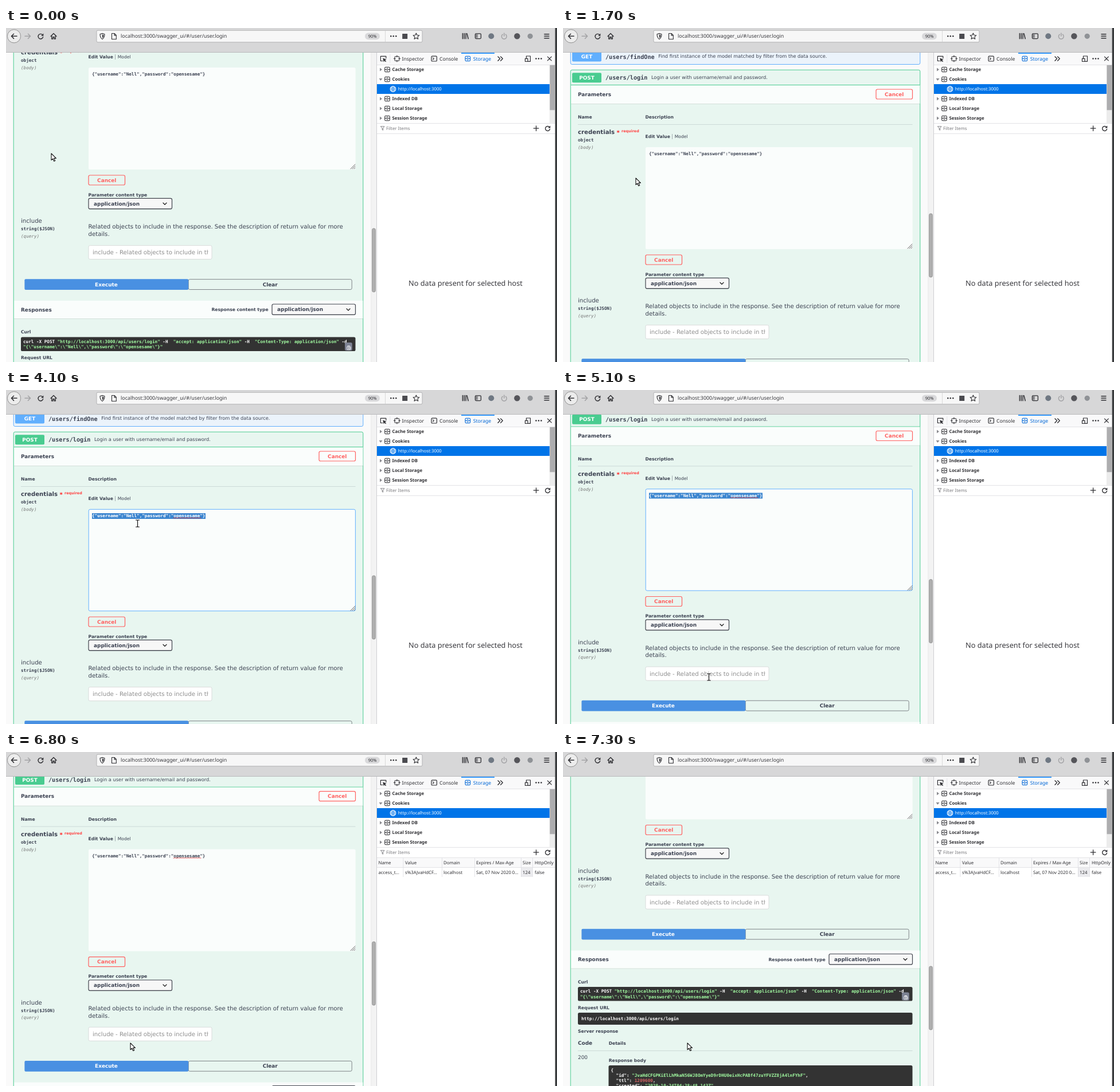
These frames come from a looping animation (961x583 px, 8000 ms). An HTML page:

```html
<!DOCTYPE html>
<html lang="en">
<head>
<meta charset="utf-8">
<title>API explorer login</title>
<style>
html, body { margin: 0; width: 100%; height: 100%; overflow: hidden; background: #fff; }
svg { display: block; width: 961px; height: 583px; }
text { font-family: "DejaVu Sans", sans-serif; white-space: pre; text-rendering: geometricPrecision; cursor: default; }
.b { font-weight: 700; }
.m { font-family: "DejaVu Sans Mono", monospace; }
.i { font-style: italic; }
.u { font-family: "Noto Sans", sans-serif; }
.mid { text-anchor: middle; }
.str { fill: #a2fca2; }
.num { fill: #d36363; }
</style>
</head>
<body>
<svg id="stage" viewBox="0 0 961 583"></svg>
<script>
const INK = '#3b4151', UI = '#2f2f33', RED = '#ff6060', GREEN = '#49cc90', BLUE = '#61affe';
// page font sizes after browser zoom
const S10 = 6.37, S12 = 7.64, S13 = 8.28, S14 = 8.92, S16 = 10.19, TAB = 8.6, SMALL = 7.8;

// y is the middle of the capitals
const text = (x, y, s, size, cls = '', fill = INK, extra = '') =>
  `<text x="${x}" y="${(y + size * .36).toFixed(2)}" font-size="${size}" class="${cls}" fill="${fill}" ${extra}>${s}</text>`;
const rect = (x, y, w, h, fill, extra = '') =>
  `<rect x="${x}" y="${y}" width="${w}" height="${h}" fill="${fill}" ${extra}/>`;
const box = (x, y, w, h, fill, stroke, r = 2.5, sw = 1.2, extra = '') =>
  rect(x, y, w, h, fill, `rx="${r}" stroke="${stroke}" stroke-width="${sw}" ${extra}`);
const line = (d, color = UI, w = 1.1, extra = '') =>
  `<path d="${d}" fill="none" stroke="${color}" stroke-width="${w}" stroke-linecap="round" stroke-linejoin="round" ${extra}/>`;
const fillPath = (d, color) => `<path d="${d}" fill="${color}"/>`;
const dot = (x, y, r, color) => `<circle cx="${x}" cy="${y}" r="${r}" fill="${color}"/>`;
const ring = (x, y, r, color, w = 1.1) => `<circle cx="${x}" cy="${y}" r="${r}" fill="none" stroke="${color}" stroke-width="${w}"/>`;
const group = (id, body, extra = '') => `<g id="${id}" ${extra}>${body}</g>`;
const dots = (x, y) => [-4.5, 0, 4.5].map(d => dot(x + d, y, 1.3, UI)).join('');
const reload = (x, y, r) =>
  line(`M${x + r * .8} ${y - r * .6}A${r} ${r} 0 1 0 ${x + r} ${y + r * .25}`, UI, 1.4) +
  fillPath(`M${x + r + .8} ${y - r - .8}v${r}h${-r}z`, UI);

const button = (x, y, w, label) =>
  box(x, y, w, 17, 'none', RED) + text(x + w / 2, y + 8.5, label, S14, 'b mid', RED);
const select = (x, y) =>
  rect(x, y + 1.2, 145.5, 18.4, '#000', 'rx="3" opacity=".16"') +
  box(x, y, 145.5, 18.4, '#f7f7f7', '#41444e') +
  text(x + 9, y + 9.2, 'application/json', S14, 'b') +
  line(`M${x + 130} ${y + 8}l3 3l3 -3`, '#222', 1.3);
const band = (y, h) =>
  rect(14, y, 608.5, h, '#fff', 'opacity=".8"') +
  rect(14, y + h, 608.5, 1, '#000', 'opacity=".09"');
const rule = y => rect(26, y, 583.5, .8, INK, 'opacity=".2"');
const code = (x, y, h) => rect(x, y, 609.5 - x, h, '#333', 'rx="2.6"');
const op = (y, h, method, path, about, color) =>
  box(13.2, y, 609.6, h, color, color, 2.6, 1, 'fill-opacity=".1"') +
  rect(16, y + 5, 51, 17, color, 'rx="2"') +
  text(41.5, y + 13.5, method, S14, 'b mid', '#fff') +
  text(74, y + 13.5, path, S16, 'm b') +
  text(path.length * 6.135 + 80.3, y + 13, about, S13);

const credentials = '{"username":"Nell","password":"opensesame"}';
const curl1 = 'curl -X POST <tspan class="str">"http://localhost:3000/api/users/login"</tspan> -H  ' +
  '<tspan class="str">"accept: application/json"</tspan> -H  <tspan class="str">"Content-Type: application/json"</tspan> -d';
const curl2 = '"{\\"username\\":\\"Nell\\",\\"password\\":\\"opensesame\\"}"';
const token = 'JvaHdCFGPKiElLhMkaN56WJ8OmYyeD9rDHU0eixHcPABf47zuYFVZZ8jA4lnFYhF';
const mono = (x, y, s, fill = '#fff') => text(x, y, s, S12, 'm b', fill);
const str = s => `<tspan class="str">"${s}"</tspan>`;

function squiggle() {
  let d = 'M292 224';
  for (let x = 292; x < 339; x += 2.4) d += 'l1.2 -1.3l1.2 1.3';
  return line(d, '#e02a2a', .8);
}

function params() {
  return op(36.5, 27, 'GET', '/users/findOne', 'Find first instance of the model matched by filter from the data source.', BLUE) +
    op(73.2, 1300, 'POST', '/users/login', 'Login a user with username/email and password.', GREEN) +
    rect(14, 99, 608.5, 1, GREEN) +
    band(100, 32) + text(26, 115.5, 'Parameters', S14, 'b') + button(546, 107, 63.5, 'Cancel') +
    text(26, 155.7, 'Name', S12, 'b') + text(143.5, 155.7, 'Description', S12, 'b') + rule(168) +
    text(26, 181.8, 'credentials', S16, 'b') + text(93.4, 182.5, '*', S16, 'b', '#f22') +
    text(102, 180, 'required', S10, 'b', '#f44') +
    text(26, 195.6, 'object', S12, 'm b') + text(26, 208.6, '(body)', S12, 'm i', '#777') +
    text(143.5, 189.7, 'Edit Value', S12, 'b') + rect(190.2, 185, .8, 9, INK, 'opacity=".5"') +
    text(194.7, 189.7, 'Model', S12) +
    rect(144, 208, 465.6, 178, '#fff', 'rx="2.6" opacity=".8"') +
    group('focus', box(144.2, 208.3, 465.2, 177.4, 'none', BLUE, 2.6, 1)) +
    group('marked', rect(150, 215, 198, 10, '#3b85cf')) +
    text(150, 219.4, credentials, S12, 'm b', INK, 'id="creds"') +
    group('spell', squiggle()) +
    line('M601 385l8 -8M604 385l5 -5M607 385l2 -2', '#555', .9) +
    button(144, 396, 63.5, 'Cancel') +
    text(143.5, 430, 'Parameter content type', S12, 'b') + select(144, 436.3) +
    text(26, 475.4, 'include', S16) + text(26, 489.3, 'string($JSON)', S12, 'm b') +
    text(26, 502, '(query)', S12, 'm i', '#777') +
    text(143.5, 485.6, 'Related objects to include in the response. See the description of return value for more', S16) +
    text(143.5, 498.3, 'details.', S16) +
    box(144, 518.6, 215, 24, '#fff', '#d6d9d8', 2.5, .9) +
    text(151, 530.6, 'include - Related objects to include in the response', S16, '', '#8d8d8d', 'clip-path="url(#field)"') +
    group('hover', box(32, 576.9, 286.5, 19, 'none', '#000', 3, 1.6, 'opacity=".25"')) +
    box(318.2, 577.7, 285, 17.8, 'none', '#7d8387', 2.4, 1) +
    rect(32.4, 577.2, 285.8, 18.8, '#4990e2', 'rx="2"') +
    text(175, 586.5, 'Execute', S14, 'b mid', '#fff') + text(460.7, 586.5, 'Clear', S14, 'b mid');
}

function responses() {
  return band(615, 31) + text(26, 630.3, 'Responses', S14, 'b') +
    text(358.5, 630.3, 'Response content type', S12, 'b') + select(464, 621) +
    text(26, 669.7, 'Curl', S12, 'b') + code(26, 678.5, 24.6) +
    mono(30, 686.2, curl1) + mono(30, 695.3, curl2, '#a2fca2') +
    rect(591, 688, 12.8, 14, '#7d8293', 'rx="2.5"') +
    box(594.8, 695, 6, 5.5, 'none', '#fff', .6, .9) + line('M596 694h3.4M601 697.8h-4m1.3 -1.3l-1.3 1.3l1.3 1.3', '#fff', .9) +
    text(26, 714.3, 'Request URL', S12, 'b') + code(26, 723.4, 21) +
    mono(32, 733.7, 'http://localhost:3000/api/users/login') +
    text(26, 755.6, 'Server response', S12, 'b') +
    text(26, 776.5, 'Code', S14, 'b') + text(79.7, 776.5, 'Details', S12, 'b') + rule(789.6) +
    text(26, 801.5, '200', S14) + text(79.7, 806.7, 'Response body', S12, 'b') + code(79.5, 815.4, 60) +
    mono(83.4, 823.5, '{') +
    mono(83.4, 832.6, `  "id": ${str(token)},`) +
    mono(83.4, 841.8, '  "ttl": <tspan class="num">1209600</tspan>,') +
    mono(83.4, 851, `  "created": ${str('2020-10-24T04:28:48.143Z')},`);
}

function toolbar() {
  return rect(0, 0, 961, 43, '#d7d7d8') + rect(0, 42, 958, 1, '#b9b9bb') +
    `<circle cx="14" cy="14.3" r="11.6" fill="#ececec" stroke="#8f8f8f"/>` +
    line('M19 14.3H9.5M13.5 10.2l-4.1 4.1l4.1 4.1', UI, 1.5) +
    line('M33 14.3h9.5M38.5 10.2l4.1 4.1l-4.1 4.1', '#a3a3a5', 1.5) +
    reload(60.3, 14.5, 4.3) +
    line('M78 14.6l5 -5l5 5M79.7 14v5h2.2v-3.2h2.2v3.2h2.2v-5', UI, 1.4) +
    box(158, 4.2, 568, 20.6, '#f7f7f7', '#b2b2b4', 2, 1) +
    line('M168 9.6l4 1.2c0 4.5 -1.2 7 -4 8.8c-2.8 -1.8 -4 -4.3 -4 -8.8z') + fillPath('M168 11.5l2.4 .7c0 2.8 -.8 4.3 -2.4 5.6z', UI) +
    line('M184.5 9.5h4.6l3.2 3.2v6.8h-7.8zM189 9.7v3.2h3') +
    text(200, 14.2, 'localhost:3000/swagger_ui/#/user/user.login', 8.9, 'u', '#38383d') +
    rect(626, 8.6, 26, 11.6, '#d9d9db', 'rx="5.8"') + text(639, 14.4, '90%', 7.4, 'u mid', UI) +
    rect(661, 5, .7, 19, '#ccc') + dots(675.8, 14.3) +
    rect(691.2, 10, 9, 9, '#4a4a4f', 'rx=".5"') +
    line('M715.4 9l1.6 3.5l3.7 .4l-2.8 2.5l.8 3.8l-3.3 -1.9l-3.3 1.9l.8 -3.8l-2.8 -2.5l3.7 -.4z') +
    line('M796.4 9.6v9.2M799.2 9.6v9.2M802 9.6v9.2M804 9.8l2.2 9', UI, 1.5) +
    box(818.4, 9.8, 10, 8.8, 'none', UI, 1.5, 1.3) + rect(819.5, 11, 3, 6.4, '#77777b') +
    dot(846.3, 14.3, 5, '#6f7883') +
    line('M866.3 11.2a4.4 4.4 0 1 0 5 0M868.8 9v5', '#a0a0a3', 1.4) +
    dot(891.4, 14.3, 5.2, '#55555a') + dot(914.2, 14.3, 4.6, '#8f9296') +
    line('M939 10.8h8M939 14.3h8M939 17.8h8', UI, 1.4);
}

const cylinder = (x, y, c) => box(x - 4.3, y - 4.3, 8.6, 8.6, 'none', c, 1.8, 1.1) +
  line(`M${x - 4} ${y}h8M${x - 1} ${y - 2.2}h2M${x - 1} ${y + 2.2}h2`, c, 1);
const treeRow = (label, i) => {
  const y = [72.5, 89.5, 123.5, 140.5, 157.5][i];
  const mark = i === 1 ? `M650.5 ${y - 1.5}h6l-3 4z` : `M652 ${y - 3}l4 3l-4 3z`;
  return fillPath(mark, '#8a8a8f') + cylinder(665, y, UI) + text(673.5, y, label, SMALL, 'u b', UI);
};

function cookieTable() {
  const x = [649.5, 696, 763, 820, 901, 922];
  const head = ['Name', 'Value', 'Domain', 'Expires / Max-Age', 'Size', 'HttpOnly'];
  const row = ['access_t...', 's%3AJvaHdCF...', 'localhost', 'Sat, 07 Nov 2020 0...', '124', 'false'];
  const cells = (list, y) => list.map((s, i) => text(x[i], y, s, SMALL, 'u', UI)).join('');
  return rect(647, 185, 310.5, 398, '#fff') + rect(647, 185, 310.5, 16, '#f9f9fa') +
    rect(647, 201, 310.5, .8, '#dcdce0') + rect(898, 202, 20, 16, '#ebebee') +
    [692.5, 760, 817, 898, 918].map(c => rect(c, 185, .8, 33, '#dddde1')).join('') +
    cells(head, 193.3) + cells(row, 209.8);
}

function devtools() {
  const blue = '#0067d6';
  return rect(646, 43, 312, 540, '#fff') + rect(646, 43, .9, 540, '#c9c9cd') +
    rect(647, 43, 311, 21, '#f9f9fa') + rect(647, 64, 311, .8, '#dcdce0') +
    line('M657 57.5h-3.6v-8.2h9.4v3.4', UI, 1.2) + fillPath('M657.2 52.4l6.5 2.6l-2.6 1.1l2 2.2l-1 1l-2.1 -2.1l-1.2 2.4z', UI) +
    rect(669.5, 46, .7, 15, '#dcdce0') +
    box(678, 49.7, 7.8, 7.6, 'none', UI, 1.4, 1.1) + line('M676.4 53.5h2.6M685 53.5h2.6M681.9 48v2.6M681.9 56.4v2.6') +
    text(690.5, 53.6, 'Inspector', TAB, 'u', UI) +
    box(742, 49.2, 9.4, 8.8, 'none', UI, 1.6, 1.2) + line('M744.4 51.8l2 1.8l-2 1.8') +
    text(756, 53.6, 'Console', TAB, 'u', UI) +
    rect(794, 43.2, 58, 1.6, '#0a84ff') + cylinder(805.3, 53.5, blue) + text(814.8, 53.6, 'Storage', TAB, 'u', blue) +
    line('M858 50l3.6 3.6l-3.6 3.6M862.7 50l3.6 3.6l-3.6 3.6', UI, 1.4) +
    line('M907.5 49h7v9.3h-4.3M907.5 49v3.5M905.5 53.3h4.5v5.2h-4.5z', UI, 1.2) + dots(929, 53.5) +
    line('M944.5 50.1l6.8 6.8M951.3 50.1l-6.8 6.8', UI, 1.3) +
    rect(647, 98, 301, 17, '#0074e8') +
    ['Cache Storage', 'Cookies', 'Indexed DB', 'Local Storage', 'Session Storage'].map(treeRow).join('') +
    ring(675, 106.5, 4.8, '#fff') + `<ellipse cx="675" cy="106.5" rx="2.1" ry="4.8" fill="none" stroke="#fff" stroke-width=".9"/>` +
    line('M670.4 105h9.2M670.4 108h9.2', '#fff', .9) +
    text(683.8, 106.5, 'http://localhost:3000', SMALL, 'u', '#fff') +
    rect(948, 64.8, 9.7, 101, '#ececec') + rect(948.5, 64.8, 8.7, 78.5, '#adadaf') +
    rect(647, 166, 311, .8, '#dcdce0') + rect(647, 184, 311, .8, '#dcdce0') +
    line('M653.6 171.8h6.4l-2.4 3v3.6l-1.6 -1v-2.6z', '#77777b', .9) +
    text(663, 175, 'Filter Items', SMALL, 'u', '#77777b') +
    line('M920.3 175.2h8.6M924.6 170.9v8.6', UI, 1.3) + reload(944.6, 175.4, 4) +
    text(801.5, 445.8, 'No data present for selected host', 12.7, 'u mid', '#38383d') +
    group('table', cookieTable());
}

const hand = 'M2 1.2c0 -1.6 2 -1.6 2 0v3.6l4.6 1c1 .3 1.3 1 1.2 2l-.6 3.6h-5.8l-3.4 -4.4c-.6 -1.2 .6 -1.8 1.4 -1l.6 .6z';
const cursors =
  group('arrow', `<path d="M0 0v11.6l2.7 -2.4l2 4.4l2 -.9l-2 -4.3h3.7z" fill="#fff" stroke="#111" stroke-width="1.1" stroke-linejoin="round"/>`) +
  group('beam', line('M-3 -6h2l1 .8l1 -.8h2M0 -5.2v10.4M-3 6h2l1 -.8l1 .8h2', '#fff', 2.6) +
    line('M-3 -6h2l1 .8l1 -.8h2M0 -5.2v10.4M-3 6h2l1 -.8l1 .8h2', '#111', 1.2)) +
  group('hand', `<path d="${hand}" fill="#fff" stroke="#111" stroke-width="1.1" stroke-linejoin="round"/>`);

document.getElementById('stage').innerHTML =
  `<defs><clipPath id="view"><rect y="43" width="637" height="540"/></clipPath>
   <clipPath id="field"><rect x="151" y="519" width="201.6" height="23"/></clipPath></defs>` +
  rect(0, 43, 637, 540, '#fafafa') +
  `<g clip-path="url(#view)">${group('page', params() + group('resp', responses()))}</g>` +
  rect(637, 43, 9, 540, '#f3f3f3') + rect(636.6, 43, .6, 540, '#dedede') +
  box(638.6, 324, 5.8, 111, '#b0b0b0', '#8c8c8c', 2.6, .8, 'id="thumb"') +
  devtools() + toolbar() + rect(957.7, 0, 3.3, 583, '#3a3c3e') +
  group('cursor', cursors);

// [time, value...]
const scrollKeys = [[0, 139], [100, 153], [600, 153], [700, 146], [900, 90], [1100, 12], [1200, 0], [4800, 0],
  [4900, 12], [5000, 28], [5100, 35.5], [5200, 38.3], [6900, 38.3], [7000, 90], [7100, 165], [7200, 228], [7300, 268.5]];
const moveKeys = [[0, 79, 219], [600, 79, 219], [1200, 93, 237], [1600, 93, 237], [1700, 127, 262], [1800, 178, 256],
  [1900, 234, 240], [2000, 222, 224], [4000, 222, 224], [4100, 229.5, 233], [4700, 240, 461], [4800, 240, 461],
  [5100, 254.5, 501], [5700, 250, 548], [6400, 250, 548], [6800, 217, 508]];
const kindKeys = [[0, 'arrow'], [1800, 'beam'], [4500, 'arrow'], [5000, 'beam'], [5300, 'arrow'], [5600, 'hand'], [6600, 'arrow']];

function at(keys, t) {
  const i = keys.findIndex(k => k[0] > t);
  if (i < 0) return keys[keys.length - 1].slice(1);
  const a = keys[i - 1], b = keys[i], p = (t - a[0]) / (b[0] - a[0]);
  return a.slice(1).map((v, n) => v + (b[n + 1] - v) * p);
}

const el = id => document.getElementById(id);
const show = (id, on) => el(id).setAttribute('visibility', on ? 'visible' : 'hidden');

function draw(now) {
  const t = Math.floor(now % 8000 / 100) * 100;
  const within = (a, b) => t >= a && t < b;
  const [scroll] = at(scrollKeys, t), [x, y] = at(moveKeys, t);
  const kind = kindKeys.filter(k => k[0] <= t).pop()[1];
  const loading = within(6100, 6500), marked = within(2900, 5800);

  el('page').setAttribute('transform', `translate(0 ${-scroll})`);
  el('thumb').setAttribute('y', loading ? 325 : 324 + scroll * .186);
  el('thumb').setAttribute('height', loading ? 109 : 111);
  el('cursor').setAttribute('transform', `translate(${x} ${y})`);
  for (const k of ['arrow', 'beam', 'hand']) show(k, k === kind);
  show('focus', within(2300, 5800));
  show('spell', t >= 2400);
  show('marked', marked);
  el('creds').setAttribute('fill', marked ? '#fff' : INK);
  show('hover', within(5700, 6600));
  show('resp', !loading);
  show('table', t >= 6600);
}

const start = performance.now();
function tick() {
  draw(performance.now() - start);
  requestAnimationFrame(tick);
}
tick();
</script>
</body>
</html>
```
